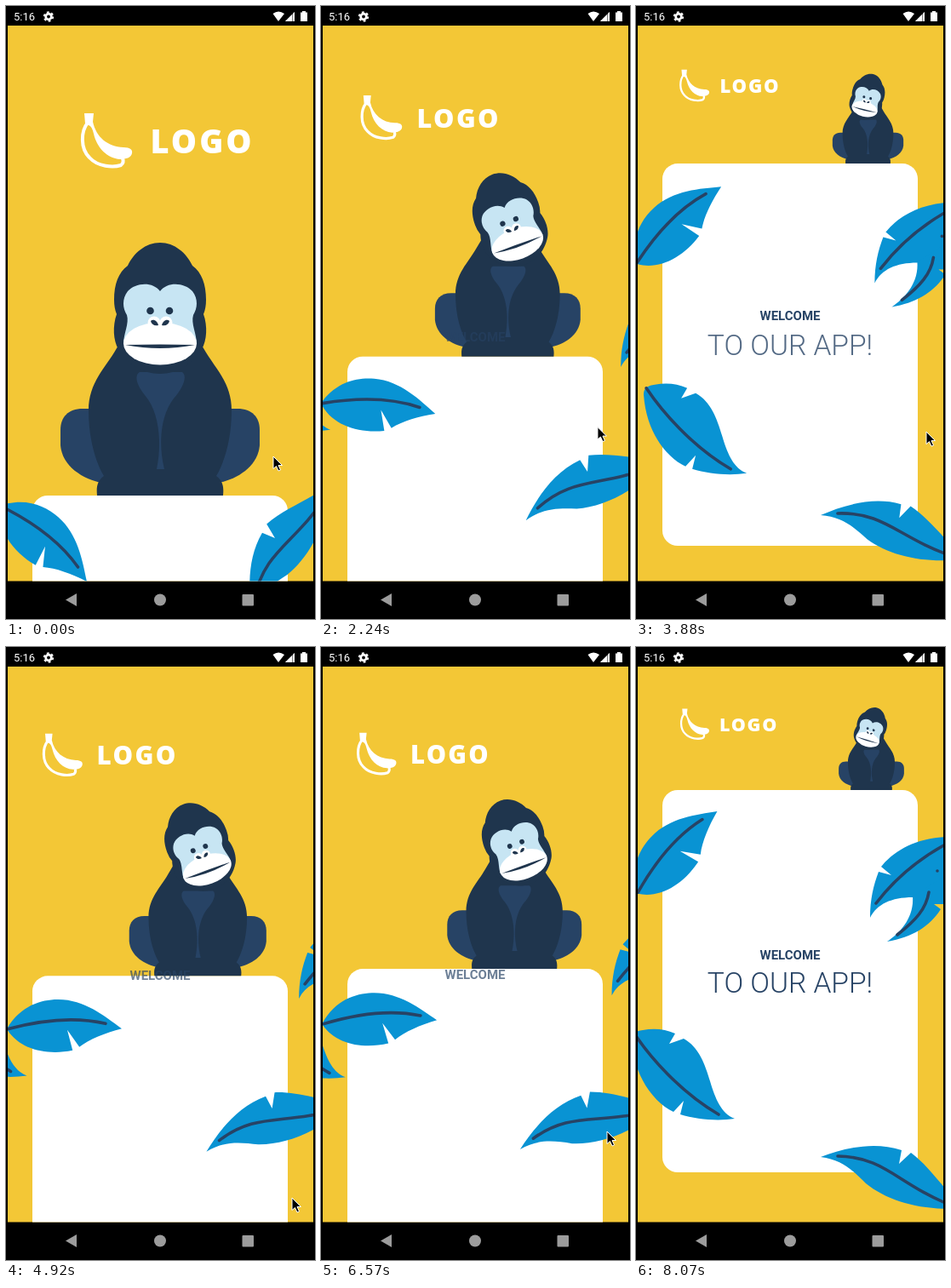
An HTML page that plays this animation: 363 px wide and 720 px high, repeating every 8520 ms.

```html
<!DOCTYPE html>
<html lang="en">
<head>
<meta charset="utf-8">
<title>Welcome screen</title>
<style>
  html, body { margin: 0; width: 100%; height: 100%; overflow: hidden; background: #000; }
  svg { display: block; width: 363px; height: 720px; }
  text { font-family: Roboto, sans-serif; }
  .dark { fill: #1f354d; }
  .mid { fill: #274365; }
  .white { fill: #fff; }
  .leaf { fill: #0993d3; }
  .vein { fill: none; stroke: #274365; stroke-width: 3.6; stroke-linecap: round; }
  .center { text-anchor: middle; fill: #274365; }
  #logo text { font: 800 38px "Open Sans", sans-serif; letter-spacing: 3px; }
</style>
</head>
<body>
<svg viewBox="0 0 363 720">
  <defs>
    <clipPath id="screen"><rect x="2" y="23" width="359" height="652.5"/></clipPath>
    <path id="thigh" class="mid" d="M116 473H90C73 473 64 483 64 498V516C66 540 89 556 116 561Z"/>
    <path id="nostril" class="dark" d="M170 370C173 367 178 370 179 375C174 376 171 374 170 370Z"/>
  </defs>

  <g clip-path="url(#screen)">
    <rect width="363" height="720" fill="#f3c736"/>

    <g id="logo" class="white">
      <path d="M92 126H103L102 136C106 154 119 165 138 166C146 166 149 169 148 173C147 178 141 180 134 180C119 179 107 167 103 150Q101 141 97 140L93 138Z"/>
      <path d="M96 137C88 147 87 167 98 178C108 189 126 190 135 187Q139 184 137 179" fill="none" stroke="#fff" stroke-width="4"/>
      <text x="169.500" y="173">LOGO</text>
    </g>

    <rect id="card" class="white" x="31" width="300" height="449" rx="18"/>

    <g id="gorilla">
      <use href="#thigh"/>
      <use href="#thigh" transform="matrix(-1 0 0 1 362 0)"/>
      <path class="dark" d="M140 385L130 402C117 425 97 442 97 475C97 510 106 537 115 552C107 558 106 565 107 575H255C256 565 255 558 247 552C256 537 265 510 265 475C265 442 245 425 232 402L222 385Z"/>
      <path class="mid" d="M157 430C150 434 154 446 163 457C181 478 183 515 177 544H186C179 515 181 482 197 461C207 450 214 435 207 430Z"/>
      <g id="head">
        <path class="dark" d="M181 278C164 278 150 290 143 305C132 313 127 327 127 345Q127 355 130 362C125 376 126 393 132 403C143 421 160 432 181 432S219 421 230 403C236 393 237 376 232 362Q235 355 235 345C235 327 230 313 219 305C212 290 198 278 181 278Z"/>
        <path d="M181 335C172 323 152 325 143 335C136 344 137 355 142 363C145 373 138 385 138 397H224C224 385 217 373 220 363C225 355 226 344 219 335C210 325 190 323 181 335Z" fill="#c7e5f3"/>
        <ellipse class="white" cx="181" cy="396.500" rx="43" ry="25"/>
        <circle class="white" cx="174" cy="372" r="7.500"/>
        <circle class="white" cx="188" cy="372" r="7.500"/>
        <use href="#nostril"/>
        <use href="#nostril" transform="matrix(-1 0 0 1 362 0)"/>
        <circle class="dark" cx="169.500" cy="358" r="4.300"/>
        <circle class="dark" cx="192" cy="358" r="4.300"/>
        <path class="dark" d="M140 398Q181 397 222 398Q181 406 140 398Z"/>
      </g>
    </g>

    <text id="welcome" class="center" x="181" font-size="15" font-weight="700">WELCOME</text>
    <text id="app" class="center" x="181" font-size="33.500" font-weight="300">TO OUR APP!</text>

    <g id="leafA">
      <path class="leaf" d="M-68 3C-52 -24 -28 -31 -8 -31C23 -31 47 -11 67 4C47 9 29 16 17 25L3 5L9 29C-22 35 -54 27 -68 3Z"/>
      <path class="vein" stroke-width="3" d="M-66 3Q0 -14 48 -2"/>
    </g>
    <g id="leafB">
      <path class="leaf" d="M9 458C8 449 14 446 22 445Q42 441 60 449L53 461L70 455C88 465 95 485 101 505C107 525 114 543 130 549C110 552 85 550 66 544L70 528L58 541C35 530 12 500 9 458Z"/>
      <path class="vein" d="M12 449C30 476 65 517 111 544"/>
    </g>
    <g id="leafC">
      <path class="leaf" d="M-92 -8C-66 -18 -30 -27 3 -16L0 0L14 -13C37 4 50 28 77 52C30 56 -12 45 -39 23C-54 8 -67 -5 -92 -8Z"/>
      <path class="vein" d="M-72 -9C-16 -8 -2 24 62 49"/>
    </g>
    <g id="leafD">
      <path class="leaf" d="M275 318C275 296 279 280 285 264L300 268L288 258C306 236 335 222 375 223V270L325 294C300 294 283 302 275 318Z"/>
      <path class="leaf" d="M295 346C310 336 327 318 325 293L368 265V302L350 302L358 308C345 328 325 341 295 346Z"/>
      <path class="vein" d="M282 301Q315 258 365 231M307 338C329 321 341 307 344 288"/>
      <circle class="mid" cx="354" cy="263" r="1.800"/>
    </g>

    <path id="cursor" d="M0 0V14.500L3.500 11.500L6 17L8.500 16L6 10.500H10.500Z" stroke="#fff"/>
  </g>

  <g class="white">
    <text x="9" y="17" font-size="13">5:16</text>
    <circle cx="50" cy="12.500" r="3.300" fill="none" stroke="#fff" stroke-width="2.800"/>
    <circle cx="50" cy="12.500" r="5.200" fill="none" stroke="#fff" stroke-width="2" stroke-dasharray="2.720"/>
    <path d="M313.500 9Q320 4 327 9L320 18Z"/>
    <path d="M339 7V18H328Z" opacity=".5"/>
    <path d="M336 10V18H328ZM337 9L339 7V18H337Z"/>
    <path d="M348 6H352V7.500H354V18H346V7.500H348Z"/>
  </g>
  <g fill="#9c9c9c">
    <path d="M70 697.500L83 690V705Z"/>
    <circle cx="181" cy="697.500" r="7"/>
    <rect x="277.500" y="691" width="13.500" height="13.500" rx="1"/>
  </g>
</svg>

<script>
const LOOP = 8520, STEP = 149.25;

// Rows of [time, progress] and [time, x, y].
const progressKeys = [
  [0, 0], [150, 0], [1190, .86], [1343, .996], [1490, 1], [1700, 1], [2600, 0], [2840, 0],
  [3880, .958], [4030, 1], [4400, 1], [4925, .464], [5370, 0], [5980, 0], [6567, .484],
  [7020, .85], [7250, 1], [LOOP, 1]
];
const cursorKeys = [
  [0, 314, 529], [1343, 315, 376], [1700, 315, 376], [2836, 336, 626], [3880, 341, 500],
  [4400, 341, 575], [4925, 336, 647], [5200, 336, 658], [5820, 336, 637], [5980, 336, 637],
  [6567, 336, 569], [7300, 338, 470], [8050, 375, 420], [LOOP, 375, 420]
];

// Rows of [progress, ...values].
const logoKeys = [[0, 188], [.48, 119.5], [1, 108.5]];
const headKeys = [[0, 0], [.48, -20], [1, 17]];
const leafAKeys = [[0, 47, 629, 41], [.48, 69, 438.5, -2], [1, 46, 238.5, -46]];
const leafBKeys = [[0, -206, -88], [.48, -102, -44], [.96, 0, 0], [1, -14, 5]];
const leafCKeys = [[0, 316, 625, -78], [.48, 312.5, 541.5, -37], [1, 309, 607, 0]];

const part = {};
for (const el of document.querySelectorAll('svg [id]')) part[el.id] = el;

const clamp = v => Math.max(0, Math.min(1, v));
const move = (id, transform) => part[id].setAttribute('transform', transform);
const place = (id, [x, y, angle = 0]) => move(id, `translate(${x} ${y}) rotate(${angle})`);

function segment(keys, x) {
  let i = 1;
  while (i < keys.length - 1 && x > keys[i][0]) i++;
  return i;
}

function linear(keys, x) {
  const i = segment(keys, x), a = keys[i - 1], b = keys[i];
  const u = (x - a[0]) / (b[0] - a[0]);
  return a.slice(1).map((v, c) => v + (b[c + 1] - v) * u);
}

// Cubic through the keys; inner slopes are the mean of their neighbours.
function smooth(keys, x) {
  const i = segment(keys, x), a = keys[i - 1], b = keys[i], last = keys.length - 1;
  const h = b[0] - a[0], u = (x - a[0]) / h, w = 1 - u;
  return a.slice(1).map((v, n) => {
    const c = n + 1;
    const secant = j => (keys[j][c] - keys[j - 1][c]) / (keys[j][0] - keys[j - 1][0]);
    const slope = j => (secant(Math.max(j, 1)) + secant(Math.min(j + 1, last))) / 2;
    return v * w * w * (1 + 2 * u) + b[c] * u * u * (3 - 2 * u)
      + h * u * w * (slope(i - 1) * w - slope(i) * u);
  });
}

function draw(time) {
  const t = Math.floor((time + 10) / STEP) * STEP;
  const [p] = linear(progressKeys, t);
  const top = 575 - 407 * p;

  part.card.setAttribute('y', top);
  move('gorilla', `translate(${181 + 95.5 * p} ${top}) scale(${1 - .672 * p}) translate(-181 -575)`);
  move('head', `rotate(${smooth(headKeys, p)} 181 350)`);
  move('logo', `translate(${smooth(logoKeys, p)} ${158 - 67.5 * p}) scale(${1 - .508 * p + .073 * p * p}) translate(-188 -158)`);

  part.welcome.setAttribute('y', 412 - 44.6 * p);
  part.welcome.setAttribute('opacity', clamp(1.4 * p));
  part.app.setAttribute('y', 506 - 100 * p);
  part.app.setAttribute('opacity', clamp(5 * p - 4));

  place('leafA', smooth(leafAKeys, p));
  place('leafB', smooth(leafBKeys, p));
  place('leafC', smooth(leafCKeys, p));
  place('leafD', [129 * (1 - p), 177 * (1 - p)]);
  place('cursor', linear(cursorKeys, t));
}

const start = performance.now();
function tick() {
  draw((performance.now() - start) % LOOP);
  requestAnimationFrame(tick);
}
tick();
</script>
</body>
</html>
```
